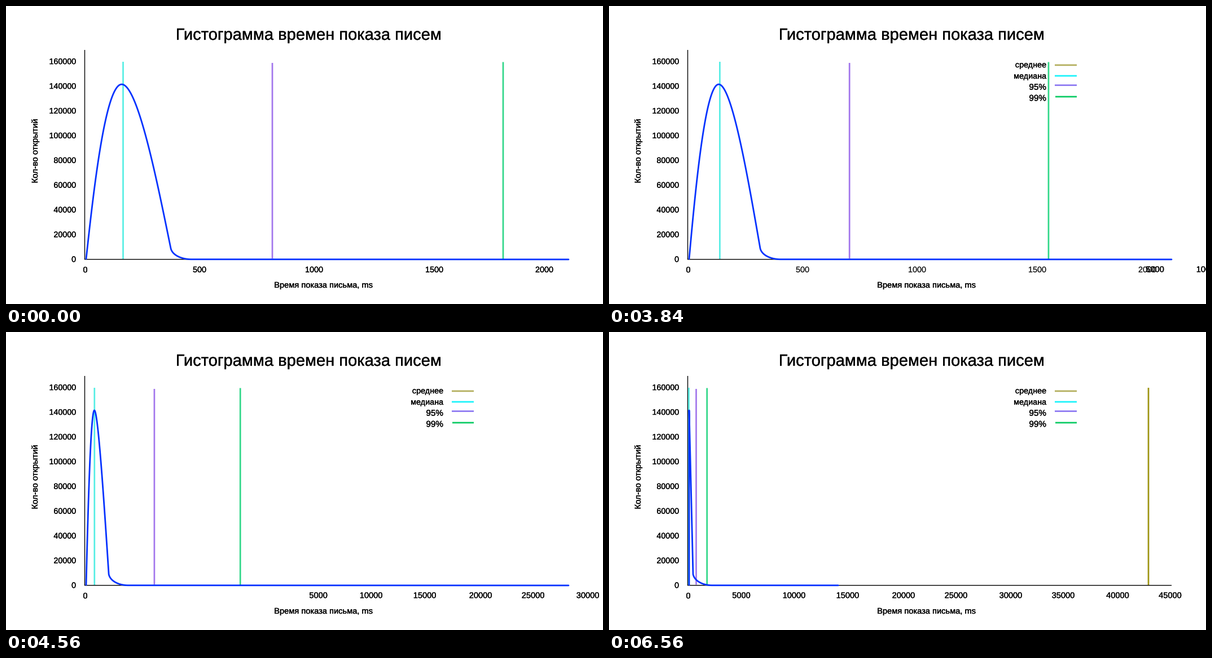
A matplotlib script for the animation above (6.6 s loop, 1058 by 529 pixels).

```python
import numpy as np
import matplotlib as mpl
import matplotlib.pyplot as plt
from matplotlib.animation import FuncAnimation
from matplotlib.patheffects import withStroke

W, H, DPI = 1058, 529, 64
LOOP, STEP = 6600, 40
PT = 72 / DPI  # points per pixel

mpl.rcParams.update({
    "font.family": "Liberation Sans",
    "path.snap": False,
    "text.hinting": "none",
    "toolbar": "None",
})

BLUE = "#0432ff"
ZOOM_START = 3638
TICK_STOP = 5115
TICK_SPEED = 0.575  # px per ms

fig = plt.figure(figsize=(W / DPI, H / DPI), dpi=DPI, facecolor="white")
ax = fig.add_axes([0, 0, 1, 1])
ax.set_xlim(0, W)
ax.set_ylim(H, 0)
ax.axis("off")

medium = [withStroke(linewidth=0.3 * PT, foreground="black")]


def text(x, y, s, size=14.4, ha="center", **kw):
    return ax.text(x, y, s, fontsize=size * PT, ha=ha, va="baseline",
                   color="black", path_effects=medium, **kw)


def line(xs, ys, color, width=2.7, cap="butt", z=2):
    return ax.plot(xs, ys, color=color, lw=width * PT, zorder=z,
                   solid_capstyle=cap, solid_joinstyle="round")[0]


def ramp(t, start, end):
    return float(np.clip((t - start) / (end - start), 0, 1))


def lerp(a, b, p):
    return a + (b - a) * p


def bezier(pts, n=40):
    p = np.asarray(pts, float)
    u = np.linspace(0, 1, n)[:, None]
    v = 1 - u
    return v**3 * p[0] + 3 * v**2 * u * p[1] + 3 * v * u**2 * p[2] + u**3 * p[3]


def curve(p):
    """Distribution curve, squeezed into a straight needle as p goes 0 to 1."""
    peak, kink = lerp(205, 142, p), lerp(292, 149, p)
    tail = lerp(37, 34, p)
    return np.vstack([
        bezier([(142, 449), (lerp(155, 142, p), 330),
                (lerp(176, 142, p), 139), (peak, 139)]),
        bezier([(peak, 139), (lerp(234, 142, p), 139),
                (lerp(269, 146.3, p), 318), (kink, 430)]),
        bezier([(kink, 430), (kink + 2.5, 442),
                (kink + 0.5 * tail, 449.7), (kink + tail, 449.7)]),
        [(997, 449.9)],
    ])


def trim(pts, cut):
    """Remove a given length from the end of a polyline."""
    if cut <= 0:
        return pts
    s = np.r_[0, np.cumsum(np.hypot(*np.diff(pts, axis=0).T))]
    end = s[-1] - cut
    tip = [np.interp(end, s, pts[:, k]) for k in (0, 1)]
    return np.vstack([pts[s < end], tip])


# Fixed parts
text(536.5, 60, "Гистограмма времен показа писем", 29.1)
text(562.5, 500, "Время показа письма, ms", 14.65)
text(56, 257.5, "Кол-во открытий", 14.9, rotation=90, rotation_mode="anchor")
for i in range(9):
    text(124, 454.3 - 43.9 * i, str(20000 * i), 14.3, ha="right")
text(140.5, 473, "0")
line([139.5, 139.5], [78, 450], "black", 1.4, z=1)
line([139, 997], [449.7, 449.7], "black", 1.4, z=1)

# Legend
legend_text, legend_lines = [], []
for name, size, base, x, y, color in [
        ("среднее", 14.4, 109, 790, 104.9, "#b3ae5c"),
        ("медиана", 14.4, 129, 790, 124, "#19f3fb"),
        ("95%", 15.2, 148.7, 790, 140.6, "#8c78f2"),
        ("99%", 15.2, 168.3, 791, 161, "#08cb62")]:
    legend_text.append(text(775, base, name, size, ha="right"))
    legend_lines.append(line([x, 829], [y, y], color))

# Moving parts
near_ticks = [text(x, 472.7, str(500 * (i + 1)))
              for i, x in enumerate((343, 546, 759, 954))]
far_x = (234.5, 328, 423, 522, 615, 712, 805, 901.5, 994.5)
far_ticks = [text(x, 472.2, str(5000 * (i + 1)), 14.6, clip_on=True)
             for i, x in enumerate(far_x)]
median = line([0, 0], [99, 449], "#55eee4")
p95 = line([0, 0], [101, 448.5], "#a276ec")
p99 = line([0, 0], [99.5, 449], "#30d788")
mean = line([0, 0], [99, 449], "#9d9412")
dist = line([], [], BLUE, 2.8, "round", z=4)


def draw(i):
    t = i * STEP

    level = (t - 760) // 200 + 1
    fade = 1 if t >= 3240 else (max(level, 0) / 13) ** 1.4
    for item in legend_text:
        item.set_alpha(min(fade, 1))
        item.set_visible(fade > 0)
    for item in legend_lines:
        item.set_alpha(ramp(t, 3200, 3640))

    squeeze = ramp(t, ZOOM_START, ZOOM_START + 1200)
    zoom = ramp(t, ZOOM_START, ZOOM_START + 1400)
    median.set_xdata([lerp(207.5, 141.5, squeeze)] * 2)
    p95.set_xdata([lerp(472, 154.5, zoom)] * 2)
    p99.set_xdata([lerp(881, 173.7, zoom)] * 2)

    shift = TICK_SPEED * max(TICK_STOP - max(t, ZOOM_START), 0)
    for item, x in zip(far_ticks, far_x):
        item.set_x(x + shift)
        item.set_visible(t > ZOOM_START and x + shift < W + 30)
    mean.set_xdata([956 + shift] * 2)
    near = 1 - ramp(t, ZOOM_START, 4280)
    for item in near_ticks:
        item.set_alpha(near)
        item.set_visible(near > 0)

    pts = trim(curve(squeeze), 1.055 * (t - 6000))
    dist.set_data(pts[:, 0], pts[:, 1])
    return []


anim = FuncAnimation(fig, draw, frames=LOOP // STEP, interval=STEP,
                     init_func=lambda: draw(0), repeat=True, blit=False)
plt.show()
```
